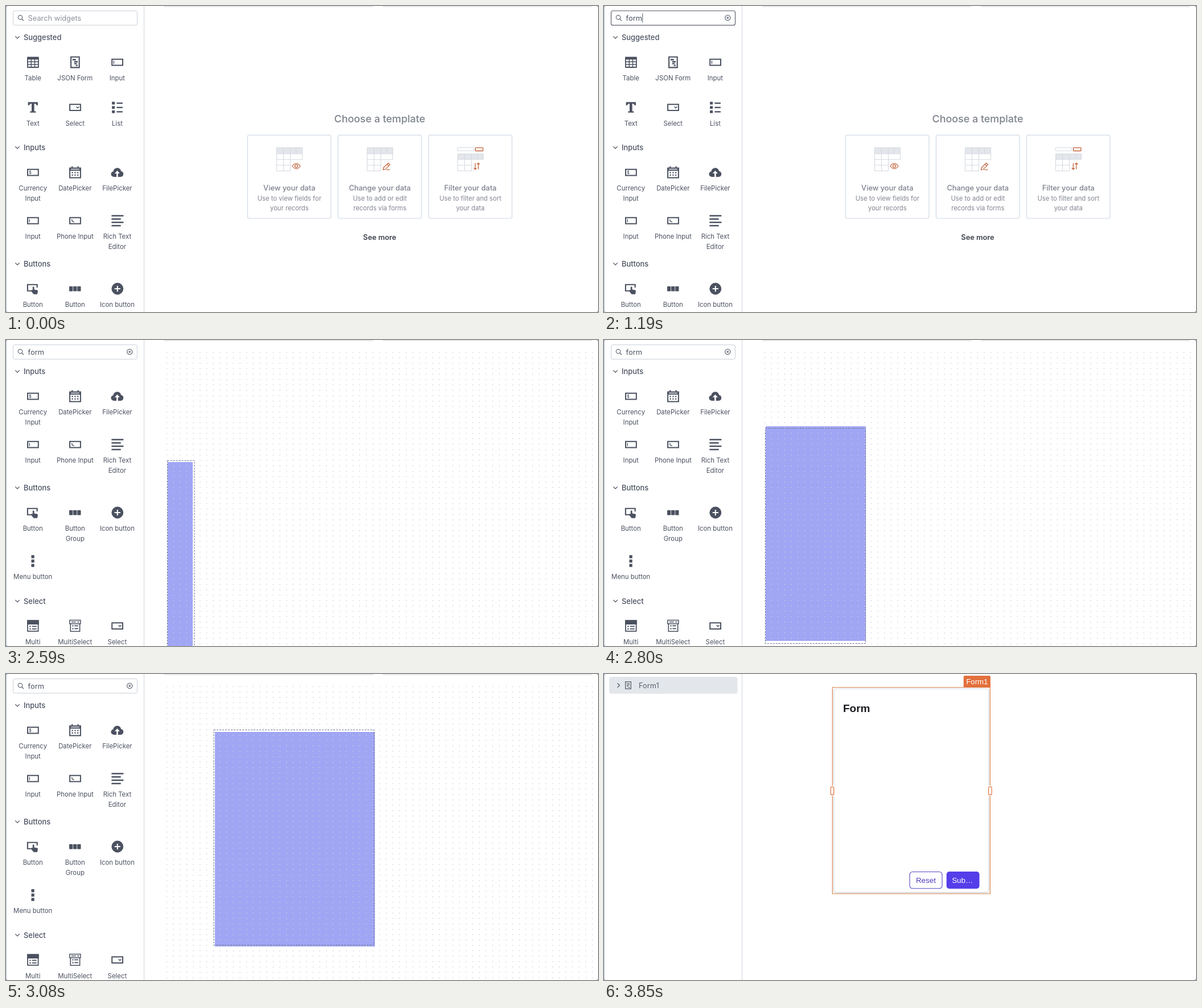
These frames come from a looping animation (1040x539 px, 4.06 s). An HTML page with a canvas:

```html
<!DOCTYPE html>
<html lang="en">
<head>
<meta charset="utf-8">
<title>Adding a form widget</title>
<style>
  html, body { margin: 0; width: 100%; height: 100%; overflow: hidden; background: #fff; }
  canvas { display: block; width: 1040px; height: 539px; }
</style>
</head>
<body>
<canvas id="stage" width="1040" height="539"></canvas>
<script>
const ctx = document.getElementById('stage').getContext('2d');
const LOOP = 4060, STEP = 70;
const INK = '#4b5160', RUST = '#bd5730', ORANGE = '#e2703c', INDIGO = '#553de9';
const UI = 'Inter, sans-serif', SANS = '"Liberation Sans", Arial, sans-serif';

// Drawing helpers
function text(str, x, y, size, color, { weight = 400, family = UI, align = 'left' } = {}) {
  ctx.font = `${weight} ${size}px ${family}`;
  ctx.textAlign = align;
  ctx.fillStyle = color;
  ctx.fillText(str, x, y);
}
function fill(x, y, w, h, color = INK, r = 0) {
  ctx.fillStyle = color;
  ctx.beginPath();
  ctx.roundRect(x, y, w, h, r);
  ctx.fill();
}
function frame(x, y, w, h, color = INK, width = 1, r = 0) {
  ctx.strokeStyle = color;
  ctx.lineWidth = width;
  ctx.beginPath();
  ctx.roundRect(x, y, w, h, r);
  ctx.stroke();
}
function stroke(d, color = INK, width = 1.3) {
  ctx.strokeStyle = color;
  ctx.lineWidth = width;
  ctx.stroke(new Path2D(d));
}
function shape(d, color = INK) {
  ctx.fillStyle = color;
  ctx.fill(new Path2D(d));
}
function disc(x, y, r, color = INK) {
  ctx.fillStyle = color;
  ctx.beginPath();
  ctx.arc(x, y, r, 0, Math.PI * 2);
  ctx.fill();
}
function at(x, y, draw, scale = 1) {
  ctx.save();
  ctx.translate(x, y);
  ctx.scale(scale, scale);
  draw();
  ctx.restore();
}

// Widget icons, each centred on the origin
const field = () => frame(-9.2, -5.2, 18.8, 10.6, INK, 2);
const page = () => frame(-7.2, -9.2, 14.6, 18.6, INK, 2.1);
const icons = {
  table() {
    fill(-10.2, -9.6, 20.8, 19.6, INK, 1);
    for (let r = 0; r < 3; r++)
      for (let c = 0; c < 3; c++) fill(-8.4 + c * 6.2, -4.7 + r * 4.7, 4.8, 3.2, '#fff');
  },
  json() {
    page();
    fill(-4.5, -5.8, 6, 2.6);
    fill(-1.5, -2.1, 6.2, 2.6);
    fill(-1.5, 1.4, 4.5, 2.2);
    fill(1.2, 4.5, 3.5, 2.2);
  },
  form() {
    page();
    fill(-4, -5.5, 8, 2.2);
    fill(-4, -2, 8, 2.2);
    fill(-4, 1.5, 4.5, 2.2);
    fill(1.5, 4.3, 3, 2.5);
  },
  input() { field(); fill(-6.6, -2.6, 1.3, 5.4); },
  text() {
    shape('M-8.5-9.3H8.7V-3.5H6.5Q6-6.4 3-6.4H2.4V7H5.2V9.3H-5V7H-2.2V-6.4H-2.8Q-5.8-6.4-6.3-3.5H-8.5Z');
  },
  select() { field(); stroke('M2.3-1.2L4.7 1.2L7.1-1.2', INK, 1.5); },
  list() {
    for (const y of [-9.8, -2.2, 5.4]) {
      fill(-9.3, y, 5, 4.8);
      fill(-1, y + 1.3, 10.5, 2.3);
    }
  },
  currency() { field(); text('$', -7, 2.6, 7, INK, { weight: 600 }); },
  date() {
    frame(-9.2, -7.6, 18.8, 17, INK, 2);
    fill(-10, -8, 20, 5.2);
    fill(-7.4, -6.2, 15, 1.3, '#fff');
    fill(-6.2, -10.6, 2.2, 3.6);
    fill(4.2, -10.6, 2.2, 3.6);
    for (let i = 0; i < 6; i++) fill(-5.8 + i % 3 * 4.8, -0.6 + (i > 2) * 4.3, 2.2, 2.2);
  },
  file() {
    shape('M-5.5 8C-12.5 8-12.5-.8-6.9-1.4C-6.5-9.5 5.6-10.2 6.7-2C12.4-1.7 12.4 8 6 8Z');
    shape('M0-3L4.5 2H1.3V8.5H-1.3V2H-4.5Z', '#fff');
  },
  phone() { field(); stroke('M-5.8-2.2C-5.5 .8-4 2.2-1.6 2.2', INK, 1.5); },
  rich() { [21, 16.3, 21, 16.3].forEach((w, i) => fill(-10, -9.8 + i * 5.83, w, 2.5)); },
  button() {
    stroke('M-1 3.7H-9.3V-7.3H7.5V-2', INK, 2.1);
    shape('M-.4-3.2Q1.2-4.4 2.4-2.6V1.4L7.7 2.6Q9.1 3.1 8.7 5L7.7 9.8H1.4L-2.7 4.8Q-2.3-.1-.4 2.8Z');
  },
  group() { for (let i = 0; i < 3; i++) fill(-10.3 + i * 7.1, -4.2, 6.3, 8.6, INK, i === 1 ? 0 : 1); },
  plus() {
    disc(.4, 0, 10.4);
    fill(-4.7, -1, 10.2, 2, '#fff');
    fill(-.6, -5.1, 2, 10.2, '#fff');
  },
  menu() { for (const y of [-10, -2.3, 5.4]) fill(-2.7, y, 5.2, 5.4); },
  tree() {
    frame(-9.2, -9, 18.6, 18.4, INK, 1.8);
    fill(-10.2, -10.2, 20.8, 7.8);
    for (const y of [0, 4.5]) { fill(-6, y, 2.4, 2); fill(-1.5, y, 8, 1.8); }
  },
  multi() {
    frame(-9.4, -10, 19, 6.3, INK, 1.5);
    stroke('M-8-3.7V9.8H8.3V-3.7', INK, 1.6);
    fill(-6.5, -7.6, 8, 1.5);
    stroke('M4-7.6L5.6-6L7.2-7.6', INK, 1.2);
    for (const y of [-1, 4]) { fill(-5, y, 2.4, 2); fill(-1, y, 6.5, 1.8); }
  }
};

// Palette contents: section title, then rows of [icon, label]
const inputRows = [
  [['currency', 'Currency|Input'], ['date', 'DatePicker'], ['file', 'FilePicker']],
  [['input', 'Input'], ['phone', 'Phone Input'], ['rich', 'Rich Text|Editor']]
];
const buttonRows = [
  [['button', 'Button'], ['group', 'Button|Group'], ['plus', 'Icon button']],
  [['menu', 'Menu button']]
];
const palettes = {
  start: [
    ['Suggested', [
      [['table', 'Table'], ['json', 'JSON Form'], ['input', 'Input']],
      [['text', 'Text'], ['select', 'Select'], ['list', 'List']]
    ]],
    ['Inputs', inputRows],
    ['Buttons', buttonRows]
  ],
  found: [
    ['Inputs', [[['input', 'Input']]]],
    ['Layout', [[['form', 'Form'], ['json', 'JSON Form']]]]
  ],
  all: [
    ['Inputs', inputRows],
    ['Buttons', buttonRows],
    ['Select', [[['tree', 'Multi|TreeSelect'], ['multi', 'MultiSelect'], ['select', 'Select']]]]
  ]
};

function drawPalette(sections, hovered) {
  let y = 55;
  for (const [title, rows] of sections) {
    stroke(`M16.3 ${y - 1.6}l3.7 3.7l3.7-3.7`);
    text(title, 31, y + 5, 12.9, INK, { weight: 500 });
    y += 44;
    for (const row of rows) {
      row.forEach(([icon, label], col) => {
        const x = 47.2 + col * 74.1, hot = label === hovered;
        if (hot) fill(x - 35, y - 19, 71, 67, '#f1f5fa', 3);
        at(x, y, icons[icon], hot ? 1.06 : 1);
        label.split('|').forEach((line, i) =>
          text(line, x, y + 32.2 + i * 17.4, 11.4, INK, { align: 'center' }));
      });
      y += row.some(([, label]) => label.includes('|')) ? 85 : 79.5;
    }
    y -= 9;
  }
}

function drawSearch(t) {
  const focused = t >= 280 && t < 2450;
  const typed = 'form'.slice(0, [910, 980, 1050, 1190].filter(k => t >= k).length);
  frame(12.5, 8.5, 218, 25.3, focused ? '#5b606b' : '#c9cfd8', focused ? 1.2 : 1, 3);
  ctx.beginPath();
  ctx.arc(25, 20, 3.7, 0, Math.PI * 2);
  ctx.strokeStyle = '#646a76';
  ctx.lineWidth = 1.2;
  ctx.stroke();
  stroke('M27.7 22.8L31 26', '#646a76');
  text(typed || 'Search widgets', 38.6, 25.8, 12.8, typed ? INK : '#8c919b');
  if (typed) {
    ctx.beginPath();
    ctx.arc(217.3, 20.8, 4.6, 0, Math.PI * 2);
    ctx.stroke();
    stroke('M215.5 19l3.6 3.6m0-3.6l-3.6 3.6', '#646a76', 1.1);
  }
  const caretOn = focused && (t < 840 || (t >= 910 && t < 1750) || t >= 2240);
  if (caretOn) {
    ctx.font = `400 12.8px ${UI}`;
    fill(39 + ctx.measureText(typed).width, 13, 1, 16, INK);
  }
}

function drawExplorer(t) {
  if (t < 3780) return;
  fill(9, 5, 225.5, 29.7, '#e3e7ec', 4);
  stroke('M23.6 16.2l3.8 3.8l-3.8 3.8', '#565c68');
  frame(37.7, 13.6, 9.6, 12.6, '#565c68', 1.3);
  fill(40, 16.3, 5, 1.2, '#565c68');
  fill(40, 18.8, 5, 1.2, '#565c68');
  fill(40, 21.3, 3, 1.2, '#565c68');
  fill(43, 23, 2.2, 1.4, '#565c68');
  text('Form1', 61, 24.8, 12.8, '#5a606b');
}

// Template cards
const LINE = '#d5d9e0', HEAD = '#e3e6eb';
function drawTable(x, y, headHeight) {
  fill(x, y, 45, headHeight, HEAD);
  frame(x, y, 45, headHeight, LINE);
}
function drawGrid(x) {
  drawTable(x, 249.5, 10.7);
  stroke(`M${x} 260v30.5h24v-41m-12 0v41M${x + 45} 260v10.3h-45m0 10h24M${x + 34} 249.5v10.5`, LINE, 1.1);
}
const templates = [
  { x: 424, title: 'View your data', lines: ['Use to view fields for', 'your records'], art() {
    drawGrid(475.5);
    stroke('M503 282Q510 272.5 517 282Q510 291.5 503 282Z', RUST, 1.2);
    ctx.beginPath();
    ctx.arc(510, 282, 2.5, 0, Math.PI * 2);
    ctx.stroke();
  } },
  { x: 583, title: 'Change your data', lines: ['Use to add or edit', 'records via forms'], art() {
    drawGrid(634.5);
    stroke('M662.5 288.5l.7-3.7l8.2-8.2l3 3l-8.2 8.2zM669.3 278.7l3 3M668 288.5h6.5', RUST, 1.2);
  } },
  { x: 742, title: 'Filter your data', lines: ['Use to filter and sort', 'your data'], art() {
    frame(793.5, 249.5, 28, 5.5, LINE);
    fill(824.5, 249.5, 13.5, 5.8, '#fbeee8');
    frame(824.5, 249.5, 13.5, 5.8, RUST, 1.2, 1);
    drawTable(793.5, 260.5, 9.7);
    stroke('M793.5 270v20.5h24v-30m-12 0v30M793.5 280.3h24M828.5 260.5v9.5', LINE, 1.1);
    stroke('M824.3 277v11m-2.6-2.6l2.6 2.6l2.6-2.6M829.8 287.5v-11m-2.5 2.6l2.5-2.6l2.6 2.6', RUST, 1.2);
  } }
];

function drawTemplates() {
  const center = { align: 'center' };
  text('Choose a template', 656.5, 205, 17.9, '#7c818b', { ...center, weight: 500 });
  for (const { x, title, lines, art } of templates) {
    frame(x + .4, 227.4, 146.5, 146.6, '#d0dae6', 1.2, 3);
    art();
    text(title, x + 73.8, 325.3, 12.8, '#7c818b', { ...center, weight: 500 });
    lines.forEach((line, i) => text(line, x + 73.8, 343.3 + i * 17, 11.25, '#808590', center));
  }
  text('See more', 656.5, 411.5, 12.8, '#3f434e', { ...center, weight: 600 });
}

// Drag and drop canvas
const COL = 11.683, ROW = 9.5, LEFT = 282.5, TOP = 22;
const DRAG_PATH = [[2590, 47, 215], [2800, 179, 152], [3080, 367, 102], [3220, 402, 25]];

function dragPoint(t) {
  let i = 1;
  while (i < DRAG_PATH.length - 1 && t > DRAG_PATH[i][0]) i++;
  const [t0, x0, y0] = DRAG_PATH[i - 1], [t1, x1, y1] = DRAG_PATH[i];
  const k = Math.min(1, (t - t0) / (t1 - t0));
  return [x0 + (x1 - x0) * k, y0 + (y1 - y0) * k];
}

function drawDrag(t) {
  const dropped = t >= 3290;
  const [x, y] = dragPoint(t);
  ctx.save();
  ctx.beginPath();
  ctx.rect(281, 0, 751, 539);
  ctx.clip();
  const visibleX = Math.max(284, x);
  if (!dropped) fill(visibleX, y, x + 281 - visibleX, 378, '#a0a6f4');
  for (let r = 0; r <= 54; r++)
    for (let c = 0; c <= 64; c++) disc(LEFT + c * COL, TOP + r * ROW, .85, '#cdced6');
  const snapX = LEFT + .8 + Math.round((x - LEFT) / COL) * COL;
  const snapY = TOP + Math.round((y - TOP) / ROW) * ROW;
  const left = Math.max(283.5, snapX);
  ctx.setLineDash([3, 2]);
  frame(left, snapY + .5, snapX + 281.5 - left, 379, dropped ? '#a6afc3' : '#6d7391');
  ctx.restore();
}

function drawForm(t) {
  ctx.save();
  ctx.shadowColor = 'rgba(0,0,0,.18)';
  ctx.shadowBlur = 3;
  ctx.shadowOffsetY = 1;
  fill(404, 26, 271.5, 358.5, '#fff', 4);
  ctx.restore();
  frame(403.9, 26, 271.8, 358.5, '#d6d8dc', 1, 4);
  frame(401.3, 23.5, 277, 363.5, '#d8834f', 1.2);
  for (const x of [398.2, 675.6]) {
    fill(x - 1, 196.5, 7.5, 18, '#fff');
    frame(x, 198.7, 5.5, 14, ORANGE, 1.2, 2);
  }
  fill(631.7, 3, 47.2, 20.4, ORANGE, [2, 2, 0, 0]);
  text('Form1', 655.3, 17.8, 13.2, '#fff', { family: SANS, align: 'center' });
  if (t < 3780) return;
  text('Form', 420, 67.3, 19, '#1b1b1f', { weight: 700, family: SANS });
  frame(537, 348.5, 57, 29.3, '#5344c4', 1.1, 5);
  text('Reset', 565.4, 368, 13.4, '#4f3dbd', { family: SANS, align: 'center' });
  fill(601.7, 348, 57.8, 30.2, INDIGO, 5);
  text('Sub…', 629.8, 368, 13.4, '#fff', { family: SANS, align: 'center' });
}

function drawWindow() {
  fill(0, 0, 1, 539, '#b9c6da');
  fill(242, 0, 1, 539, '#d0d6de');
  for (const [x, y] of [[0, 0], [1040, 0], [0, 539], [1040, 539]]) {
    const sx = x ? -3 : 3, sy = y ? -3 : 3;
    shape(`M${x} ${y}h${sx}q${-sx} 0 ${-sx} ${sy}z`, '#5b7196');
  }
}

function render(t) {
  fill(0, 0, 1040, 539, '#fff');
  const placed = t >= 3430;
  if (placed) {
    drawExplorer(t);
    drawForm(t);
  } else {
    const palette = t < 1540 ? 'start' : t < 2590 ? 'found' : 'all';
    const hovered = t < 1890 || t >= 2590 ? null : t < 2100 ? 'Input' : 'Form';
    drawPalette(palettes[palette], hovered);
    drawSearch(t);
    if (t < 2590) drawTemplates();
    else drawDrag(t);
  }
  if (t < 3290)
    for (const x of [278, 662]) frame(x + .3, -8, 367, 9, '#cbd1da', 1.1, 2);
  drawWindow();
}

function tick() {
  const t = performance.now() % LOOP;
  render(Math.floor(t / STEP) * STEP);
  requestAnimationFrame(tick);
}
tick();
</script>
</body>
</html>
```
